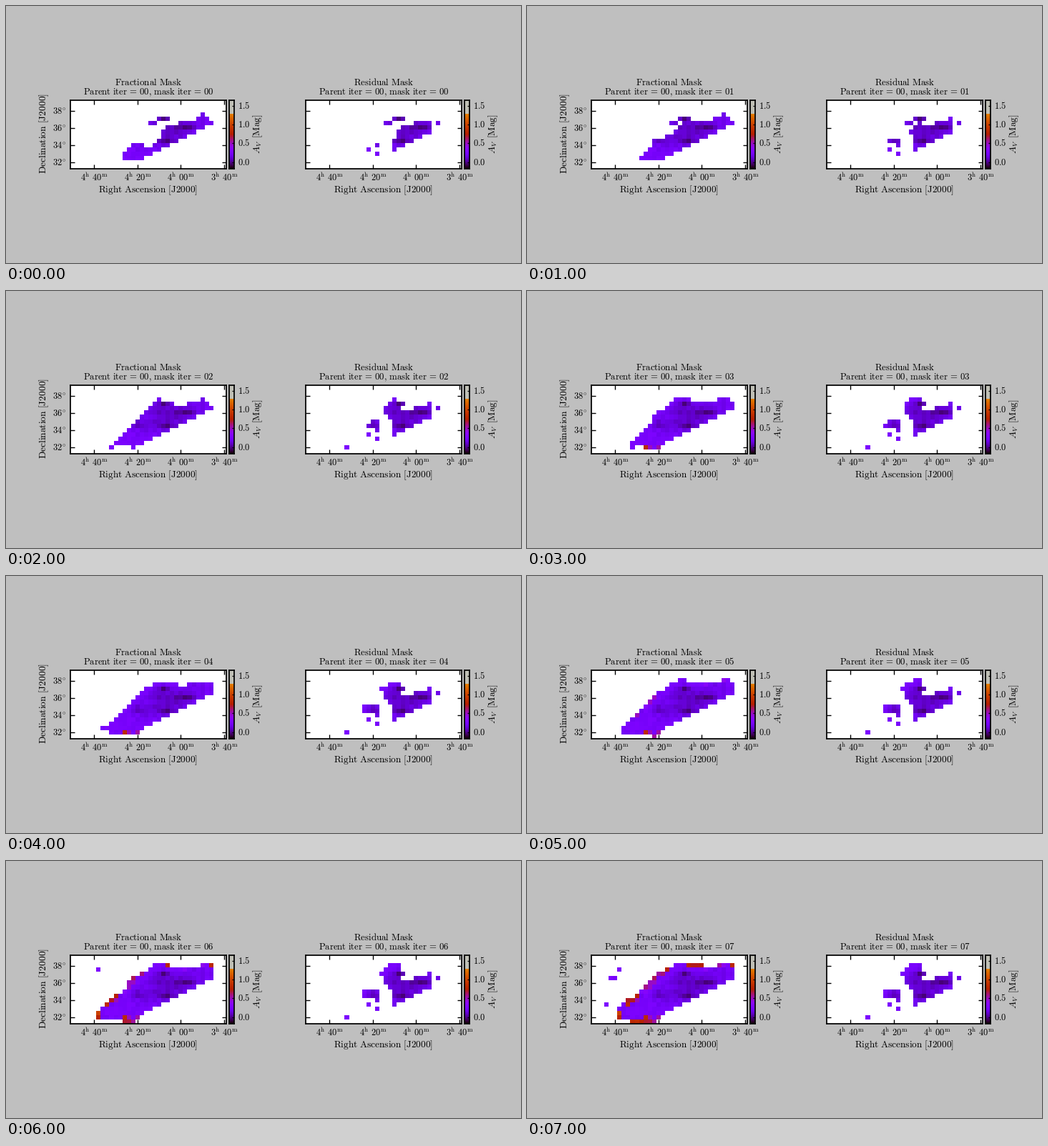
Write a matplotlib script that moves like this. It is 720 px wide and 360 px high and loops after 8 s.

```python
import matplotlib.pyplot as plt
import numpy as np
from matplotlib.animation import FuncAnimation

plt.rcParams["mathtext.fontset"] = "cm"

W, H, DPI = 720, 360, 90
ROWS, COLS, STEPS = 16, 36, 8
VMIN, VMAX = -0.18, 1.65
TOP, BOTTOM = 131.56, 228.44
NEVER = 99
ROW, COL = np.mgrid[:ROWS, :COLS]

# Upper outline of the cloud at the start, after two steps and at the end
OUTLINE_X = [6, 9, 12, 15, 18, 20, 22, 25, 28, 31, 33]
OUTLINES = [
    [16, 16, 13, 9.3, 11.5, 10, 6.5, 5.5, 5, 3, 5.5],
    [16, 15, 12, 8, 5.4, 3.4, 3.6, 5, 4.2, 3, 5.5],
    [13, 10, 7.5, 4.2, 3, 2, 2, 2.4, 2.8, 2, 2],
]
# Detached pieces: row, first column, end column, step
ISLANDS = [(4, 20, 23, 0), (5, 18, 20, 0), (14, 9, 10, 2), (3, 6, 7, 6),
           (5, 4, 6, 7), (11, 3, 4, 7)]
# Single residual cells (row, column)
SPECKS = [(5, 30), (12, 16), (10, 16), (11, 14), (14, 9)]
# Dark cores: column, row, depth, width, height
CORES = [(22, 9, 0.15, 1.7, 0.8), (26, 6, 0.13, 2.2, 0.8),
         (21.2, 4, 0.2, 1, 0.7), (15.2, 8.6, 0.13, 1.8, 1),
         (19.5, 5, 0.1, 2, 1.5)]


def cloud(step):
    """Cells inside the cloud outline at a step."""
    phase = step / 2 if step < 2 else 1 + ((step - 2) / 5) ** 0.7
    keys = [np.interp(phase, range(3), ys) for ys in zip(*OUTLINES)]
    upper = np.interp(COL + 0.5, OUTLINE_X, keys)
    right = np.minimum(33, np.maximum(43.9 - 2.15 * ROW, 30 - ROW))
    floor = 13.3 + 0.35 * step - 0.15 * abs(COL - 14)
    return (ROW + 0.5 >= upper) & (COL < right) & (ROW <= floor) & (COL >= 6)


def build_birth():
    birth = np.full((ROWS, COLS), NEVER)
    for step in range(STEPS):
        birth[cloud(step)] = np.minimum(birth, step)[cloud(step)]
    for row, a, b, step in ISLANDS:
        birth[row, a:b] = np.minimum(birth[row, a:b], step)
    return birth


def ellipse(cx, cy, rx, ry):
    return ((COL + 0.5 - cx) / rx) ** 2 + ((ROW + 0.5 - cy) / ry) ** 2 <= 1


def build_quiet():
    ridge = (COL >= 20) & (COL < 29) & (ROW + 0.33 * (COL - 20) >= 6.4)
    quiet = ridge | ellipse(20, 4.6, 2.6, 3.2) | ellipse(15, 9, 2.2, 1.4)
    for row, col in SPECKS:
        quiet[row, col] = True
    return quiet


def build_values(birth, quiet):
    noise = np.random.default_rng(4).uniform(-1, 1, (ROWS, COLS))
    tilt = ROW - 7 + 0.3 * (COL - 22)
    v = 0.25 - 0.17 * np.exp(-((COL - 23) / 7) ** 2 - (tilt / 3) ** 2)
    for cx, cy, depth, sx, sy in CORES:
        v -= depth * np.exp(-((COL - cx) / sx) ** 2 - ((ROW - cy) / sy) ** 2)
    v += 0.04 * noise
    # Cells that join late, at the rim, are brighter
    rim = ~quiet & ((COL >= 8) | (ROW >= 13))
    late = 0.22 + 0.1 * np.clip(ROW - 8, 0, 3) + 0.25 * (ROW <= 3)
    v += np.where(rim & (birth == 5), 0.1 + 0.12 * noise, 0)
    v += np.where(rim & (birth >= 6), late + 0.18 * noise, 0)
    foot = (ROW >= 14) & (COL >= 12) & (birth >= 3)
    return v + np.where(foot & (birth < 6), 0.4 + 0.15 * noise, 0)


BIRTH, QUIET = build_birth(), build_quiet()
VALUES = build_values(BIRTH, QUIET)

fig = plt.figure(figsize=(W / DPI, H / DPI), dpi=DPI, facecolor="0.75")


def box(x0, x1):
    ax = fig.add_axes([x0 / W, 1 - BOTTOM / H, (x1 - x0) / W, (BOTTOM - TOP) / H])
    for spine in ax.spines.values():
        spine.set_linewidth(1.4)
    return ax


def put(x, y, text, size=10, **kw):
    kw = {"ha": "center", "va": "baseline", "rotation_mode": "anchor", **kw}
    return fig.text(x / W, 1 - y / H, f"${text}$", fontsize=size, **kw)


def rm(text):
    return r"\mathrm{" + text.replace(" ", r"\ ") + "}"


def iteration(step):
    # "=" and "," bring part of their own spacing
    return r"$\mathrm{Parent\ iter\,=\,00,\,mask\ iter\,=\,%02d}$" % step


def colorbar(x0):
    ax = box(x0, x0 + 7)
    ax.imshow(np.linspace(VMIN, VMAX, 256)[:, None], cmap="gnuplot",
              extent=(0, 1, VMIN, VMAX), origin="lower", aspect="auto")
    ax.axhspan(1.28, VMAX, color="#bfbfb5", lw=0)
    ax.set_xticks([])
    marks = [0, 0.5, 1, 1.5]
    ax.set_yticks(marks, [""] * 4)
    ax.tick_params(direction="in", left=False, right=True, length=2.8, width=1)
    for m in marks:
        y = BOTTOM - (m - VMIN) / (VMAX - VMIN) * (BOTTOM - TOP)
        put(x0 + 12.3, y + 4, rm(f"{m:.1f}"), ha="left")
    put(x0 + 43, 179, r"A_V\ \," + rm("[Mag]"), 10.7, rotation=90)


def panel(x0, name):
    ax = box(x0, x0 + 218)
    ax.set_facecolor("white")
    image = ax.imshow(np.ma.masked_all((ROWS, COLS)), cmap="gnuplot",
                      vmin=VMIN, vmax=VMAX, extent=(0, COLS, ROWS, 0),
                      origin="lower", aspect="auto", interpolation="nearest")
    ax.set_xticks([5.5, 15.5, 25.5, 35.5], [""] * 4)
    ax.set_yticks([2.5, 6.5, 10.5, 14.5], [""] * 4)
    ax.tick_params(direction="in", top=True, right=True, length=4.8, width=1.1)
    for k, (h, m) in enumerate([(4, "40"), (4, "20"), (4, "00"), (3, "40")]):
        put(x0 + 33.3 + 60.5 * k, 245,
            rf"\mathrm{{{h}}}^\mathrm{{h}}\ \mathrm{{{m}}}^\mathrm{{m}}")
    put(x0 + 108.5, 261, rm("Right Ascension [J2000]"), 10.65)
    put(x0 + 109.5, 111, rm(name), 10.4)
    title = put(x0 + 109.2, 124, rm("0"), 10.2)
    colorbar(x0 + 222)
    return image, title


left, left_title = panel(90, "Fractional Mask")
right, right_title = panel(419, "Residual Mask")
for k, deg in enumerate((38, 36, 34, 32)):
    put(83.5, 151 + 24.1 * k, rf"\mathrm{{{deg}}}^{{\circ}}", ha="right")
put(56.3, 179, rm("Declination [J2000]"), 10.8, rotation=90)


def show(image, mask):
    image.set_data(np.ma.array(VALUES, mask=~mask)[::-1])


def update(step):
    inside = BIRTH <= step
    show(left, inside)
    show(right, inside & QUIET)
    for title in (left_title, right_title):
        title.set_text(iteration(step))
    return left, right, left_title, right_title


anim = FuncAnimation(fig, update, frames=STEPS, interval=1000, repeat=True)
plt.show()
```
